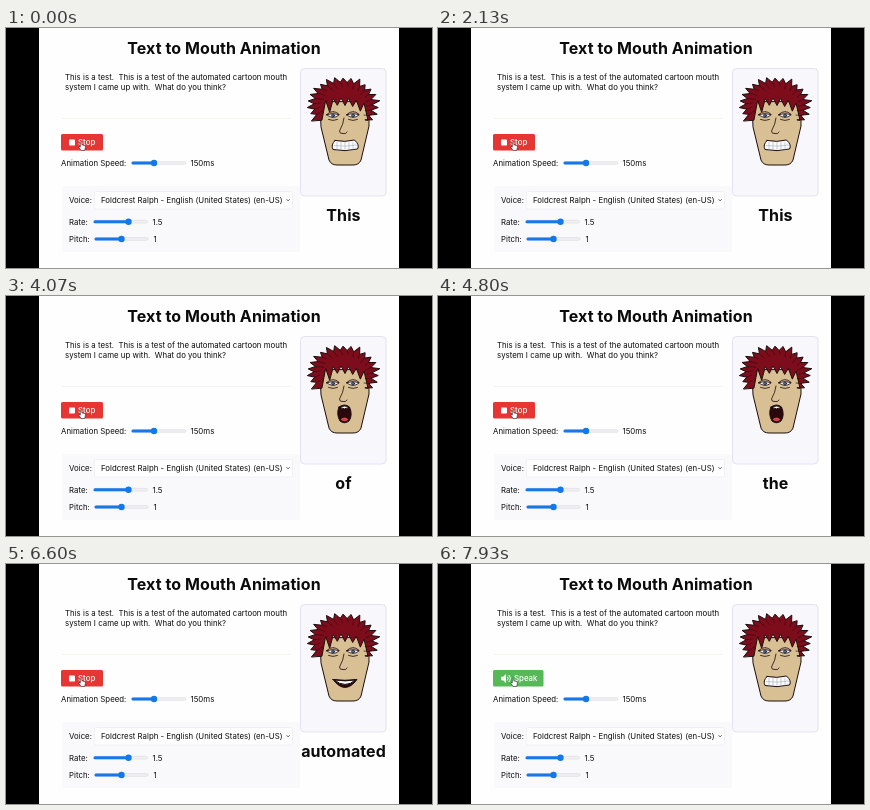
An HTML page for the animation above (7990 ms loop, 426x240 px).

```html
<!DOCTYPE html>
<html lang="en">
<head>
<meta charset="utf-8">
<title>Text to Mouth Animation</title>
<style>
  html, body { margin: 0; width: 100%; height: 100%; overflow: hidden; background: #000; }
  svg { display: block; width: 100%; height: 100%; }
  text { font: 400 7.8px Inter, Roboto, sans-serif; letter-spacing: .03px; fill: #0b0b0c; white-space: pre; }
  .big { font-size: 16px; font-weight: 700; letter-spacing: .08px; text-anchor: middle; }
  .button text { fill: #fff; font-weight: 500; }
  .face { stroke: #1c0d0d; stroke-linejoin: round; stroke-linecap: round; }
  .line { fill: none; stroke-width: .8; }
  .teeth { fill: #f8fafc; }
  .grid { fill: none; stroke: #9aa3ad; stroke-width: .5; }
  .dark { fill: #2b080b; }
  .lip { fill: #b5121f; }
  .tongue { fill: #d8444c; stroke: none; }
  .hair { fill: #7e0d1b; }
  .strand { fill: none; stroke: #3a0710; stroke-width: .7; }
</style>
</head>
<body>
<svg viewBox="0 0 426 240">
  <rect width="426" height="240"/>
  <rect x="33" width="360" height="240" fill="#fefefe"/>
  <text class="big" x="218" y="26">Text to Mouth Animation</text>

  <path d="M56 90.5H285" stroke="#f3f3ec" stroke-width=".8"/>
  <text x="59" y="51.7">This is a test.  This is a test of the automated cartoon mouth</text>
  <text x="59" y="61.7">system I came up with.  What do you think?</text>

  <g class="button" id="stop">
    <rect x="55" y="106" width="42" height="16.5" rx="1.5" fill="#e53633"/>
    <rect x="63" y="111.5" width="6" height="6" rx=".8" fill="#fff"/>
    <text x="72" y="117.2">Stop</text>
  </g>
  <g class="button" id="speak">
    <rect x="55" y="106" width="50.5" height="16.5" rx="1.5" fill="#55b958"/>
    <path d="M63 112.7h2l3-2.7v9l-3-2.7h-2z" fill="#fff"/>
    <path d="M69.3 112.6q1.6 1.9 0 3.8M70.7 111q3.2 3.5 0 7" fill="none" stroke="#fff"/>
    <text x="76" y="117.2">Speak</text>
  </g>
  <path d="M74.3 119v-4.5q.8-1.3 1.5 0v2.3l2.9.7q.9.4.7 1.7l-.7 3.3h-3.5l-2.5-3.3q.1-1 1.6-.2z"
    fill="#fff" stroke="#222" stroke-width=".6"/>

  <rect x="56" y="158" width="238" height="66" rx="3" fill="#f9f9fc"/>
  <rect x="88.5" y="163.5" width="198" height="17.5" rx="2" fill="#fefefe" stroke="#eeeef2" stroke-width=".8"/>
  <text x="55" y="137.8">Animation Speed:</text>
  <text x="184.5" y="137.8">150ms</text>
  <text x="63" y="175">Voice:</text>
  <text x="95" y="175">Foldcrest Ralph - English (United States) (en-US)</text>
  <path d="M280.6 171.3l1.5 1.5 1.5-1.5" fill="none" stroke="#222" stroke-width=".8"/>
  <text x="63" y="196.5">Rate:</text>
  <text x="146.5" y="196.5">1.5</text>
  <text x="63" y="213.8">Pitch:</text>
  <text x="147.5" y="213.8">1</text>
  <g id="sliders"></g>

  <rect x="294.5" y="40.5" width="85.5" height="127.5" rx="4" fill="#f8f8fc" stroke="#dcdcee" stroke-width=".8"/>
  <g class="face">
    <path fill="#d8bf94" d="M314 74L315 99 323 132Q325 137 331 137H347Q353 137 355 132L363 98V74Z"/>
    <g id="hair"></g>
    <g id="eyes"></g>
    <path class="line" d="M338 90Q337.500 96 333.500 103 333.500 106 337 105.500 340 106.500 341 104"/>
    <g id="mouth"></g>
  </g>
  <text class="big" id="word" x="337.5" y="192.5"></text>
</svg>
<script>
const LOOP = 7990, SPEECH_END = 7930, SYLLABLE = 435, CENTER = 339;
const byId = id => document.getElementById(id);
const path = (cls, d) => `<path class="${cls}" d="${d}"/>`;
const noise = n => Math.abs(Math.sin(n * 12.9898) * 43758.5453) % 1;
const range = (count, make) => Array.from({ length: count }, (_, i) => make(i));

// Sliders
const slider = (x, y, width, thumb) => `
  <rect x="${x}" y="${y - 1.3}" width="${width}" height="2.6" rx="1.3" fill="#f1f1f4" stroke="#cfcfd6" stroke-width=".5"/>
  <rect x="${x}" y="${y - 1.5}" width="${thumb - x}" height="3" rx="1.5" fill="#1677e8"/>
  <circle cx="${thumb}" cy="${y}" r="3.2" fill="#1677e8"/>`;
byId('sliders').innerHTML =
  slider(125.5, 135, 54.5, 148) + slider(87.5, 193.7, 54, 122.5) + slider(88.5, 211, 53.5, 115.5);

// Hair: spikes around an ellipse, closed by a jagged fringe
const SPIKES = 18, FRINGE = 7;
const hairPoint = (step, reach) => {
  const angle = Math.PI * (0.82 + 1.36 * step / SPIKES);
  return [337 + 36 * reach * Math.cos(angle), 77 + 28.5 * reach * Math.sin(angle)];
};
const crown = range(SPIKES + 1, i => [
  hairPoint(i, 0.94 + 0.1 * noise(i + 1)), hairPoint(i + 0.6, 0.8)
]).flat();
const fringe = range(FRINGE, i => {
  const x = 362 - 46 * i / (FRINGE - 1), edge = ((x - CENTER) / 23) ** 2;
  return [[x, 75 + 4 * noise(i + 3) + 15 * edge], [x - 4, 70 + 5 * edge]];
}).flat().slice(0, -1);
const strands = range(SPIKES, i =>
  `M${hairPoint(i + 0.6, 0.8)}L${hairPoint(i + 0.9, 0.58 + 0.12 * noise(i + 7))}`);
byId('hair').innerHTML =
  path('hair', `M${[...crown, ...fringe].join('L')}Z`) + path('strand', strands.join(''));

// A lens shape with separate bulge above and below its corners
const lens = (x, y, half, up, down) =>
  `M${x - half} ${y}Q${x} ${y - 2 * up} ${x + half} ${y} ${x} ${y + 2 * down} ${x - half} ${y}Z`;

byId('eyes').innerHTML = [327, 347].map(x => `
  <path d="${lens(x, 87, 6, 2.2, 2.5)}" fill="#e6edf2" stroke-width=".8"/>
  <path d="${lens(x, 86.5, 6.3, 3, -0.8)}" fill="#bfa083" stroke-width=".7"/>
  <circle cx="${x}" cy="87.5" r="1.5" fill="#3f6fa0" stroke-width=".6"/>
  <path class="line" d="M${x - 4.5} 91.5q4.5 2 9 0"/>`).join('');

const clenched = 'M329 112.5Q339 114.500 348.500 112 354 117 351.500 121 339 124 327 121.500 324.500 117 329 112.500Z';
const mouths = {
  clench: path('teeth', clenched)
    + path('grid', 'M328 117.5Q339 119 351 117' + range(5, i => `M${331 + 4 * i} 114.5v7`).join('')),
  open: path('lip', lens(CENTER, 116, 12, 3, 8))
    + path('dark', lens(CENTER, 116.5, 10, 2, 5))
    + path('teeth', lens(CENTER, 116.5, 9, 1.6, 1))
    + path('tongue', lens(CENTER, 120, 6, 0.8, 1.2)),
  round: path('dark', 'M333 111Q338.500 107 343.500 111 347 119 343 125 338.500 128.500 334 125 330 118 333 111Z')
    + path('teeth', lens(338.5, 111.5, 4.5, 1.6, 1.4))
    + path('tongue', lens(338.5, 123.5, 4, 2, 1.8)),
  smile: path('dark', lens(CENTER, 115.5, 12, -0.8, 8))
    + path('teeth', lens(CENTER, 116, 10.5, -0.9, 4.5))
};

// Each letter picks a mouth; each word lasts as long as its syllables
const mouthFor = letter =>
  /[ai]/i.test(letter) ? 'open' : /[eou]/i.test(letter) ? 'round' :
  /[thsc]/i.test(letter) ? 'clench' : letter ? 'smile' : 'clench';

const phrases = [[0, 'This is a test'], [2010, 'This is a test'], [4060, 'of the automated cartoon']];
const words = phrases.flatMap(([start, phrase]) => {
  let next = start;
  return phrase.split(' ').map(text => {
    const length = SYLLABLE * text.match(/[aeiou]+/g).length;
    next += length;
    return { text, length, start: next - length };
  });
});

let shownMouth;
function draw(time) {
  const word = time < SPEECH_END && words.findLast(({ start }) => time >= start);
  byId('stop').style.display = word ? '' : 'none';
  byId('speak').style.display = word ? 'none' : '';
  byId('word').textContent = word ? word.text : '';
  const letter = word && word.text[Math.floor((time - word.start) / word.length * word.text.length)];
  const mouth = mouthFor(letter || '');
  if (mouth !== shownMouth) byId('mouth').innerHTML = mouths[shownMouth = mouth];
}

const start = performance.now();
function tick() {
  draw((performance.now() - start) % LOOP);
  requestAnimationFrame(tick);
}
tick();
</script>
</body>
</html>
```
